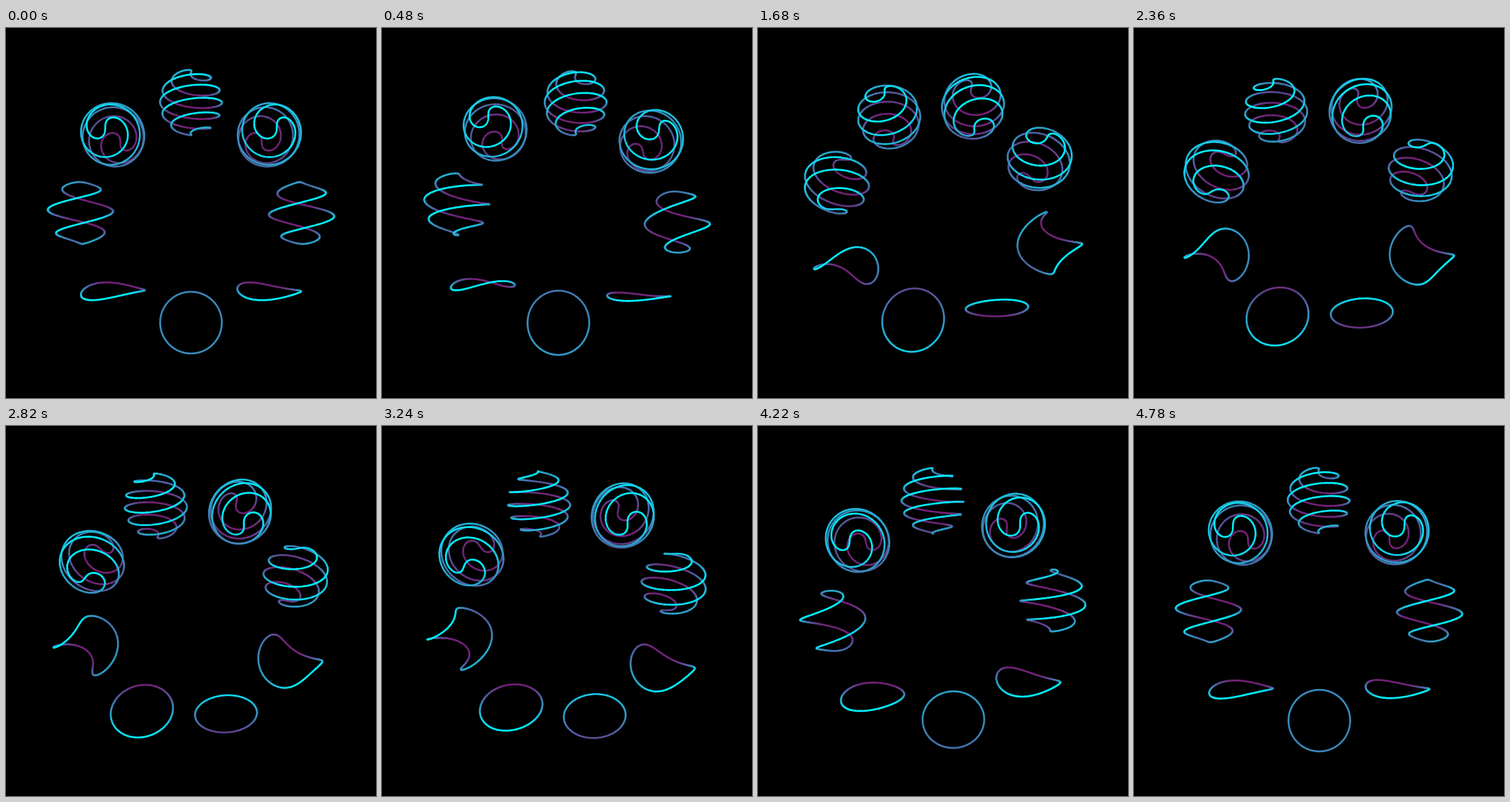
An HTML page with a canvas for the animation above (4800 ms loop, 540 by 540 pixels).

```html
<!DOCTYPE html>
<html lang="en">
<head>
<meta charset="utf-8">
<title>Twisting rings</title>
<style>
  html, body { margin: 0; width: 100%; height: 100%; overflow: hidden; background: #000; }
  canvas { display: block; width: 540px; height: 540px; }
</style>
</head>
<body>
<canvas id="stage" width="540" height="540"></canvas>
<script>
const LOOP = 4800;
const MID = 270;
const COUNT = 8;
const ORBIT = 160;
const RADIUS = 45;
const CAMERA = MID / Math.tan(Math.PI / 6);
const MAX_TWIST = 8;
const STEPS = 640;
const LEVELS = 48;
const BACK = [112, 34, 117];
const FRONT = [0, 240, 255];

const ctx = document.getElementById('stage').getContext('2d');
ctx.lineWidth = 2.7;
ctx.lineCap = ctx.lineJoin = 'round';

const ease = (p, g) => p < 0.5 ? 0.5 * (2 * p) ** g : 1 - 0.5 * (2 - 2 * p) ** g;

// Colour for a depth from -1 (far) to 1 (near)
function shade(depth) {
  const t = Math.min(1, Math.max(0, 0.5 + 0.62 * depth));
  return `rgb(${BACK.map((b, i) => Math.round(b + (FRONT[i] - b) * t)).join(',')})`;
}

const colours = Array.from({ length: LEVELS }, (_, i) => shade((i + 0.5) / LEVELS * 2 - 1));

// A great circle twisted in proportion to height; pos runs 0..8 around the orbit
function addRing(pos, paths) {
  const orbit = pos / COUNT * 2 * Math.PI;
  const cx = -ORBIT * Math.sin(orbit);
  const cy = ORBIT * Math.cos(orbit);
  const tilt = pos * Math.PI / 2;
  const c = Math.cos(tilt), s = Math.sin(tilt);
  const twist = MAX_TWIST * ease(1 - Math.abs(1 - pos / 4), 4.5);

  const point = i => {
    const a = i / STEPS * 2 * Math.PI;
    const height = Math.cos(a);
    const r = RADIUS * Math.sin(a);
    const x = r * Math.cos(twist * height);
    const y = RADIUS * height;
    const z = r * Math.sin(twist * height);
    const depth = y * s + z * c;
    const k = CAMERA / (CAMERA - depth);
    return { x: MID + (cx + x) * k, y: MID + (cy + y * c - z * s) * k, z: depth / RADIUS };
  };

  let prev = point(0), last = -1;
  for (let i = 1; i <= STEPS; i++) {
    const next = point(i);
    const near = (prev.z + next.z) / 4 + 0.5;
    const level = Math.min(LEVELS - 1, Math.max(0, Math.floor(near * LEVELS)));
    if (level !== last) paths[level].moveTo(prev.x, prev.y);
    paths[level].lineTo(next.x, next.y);
    prev = next;
    last = level;
  }
}

function draw(time) {
  const phase = (time % LOOP) / LOOP;
  const paths = colours.map(() => new Path2D());
  for (let i = 0; i < COUNT; i++) addRing(i + phase, paths);

  ctx.fillStyle = '#000';
  ctx.fillRect(0, 0, 540, 540);
  paths.forEach((path, i) => {
    ctx.strokeStyle = colours[i];
    ctx.stroke(path);
  });
}

const start = performance.now();
function frame() {
  draw(performance.now() - start);
  requestAnimationFrame(frame);
}
frame();
</script>
</body>
</html>
```
